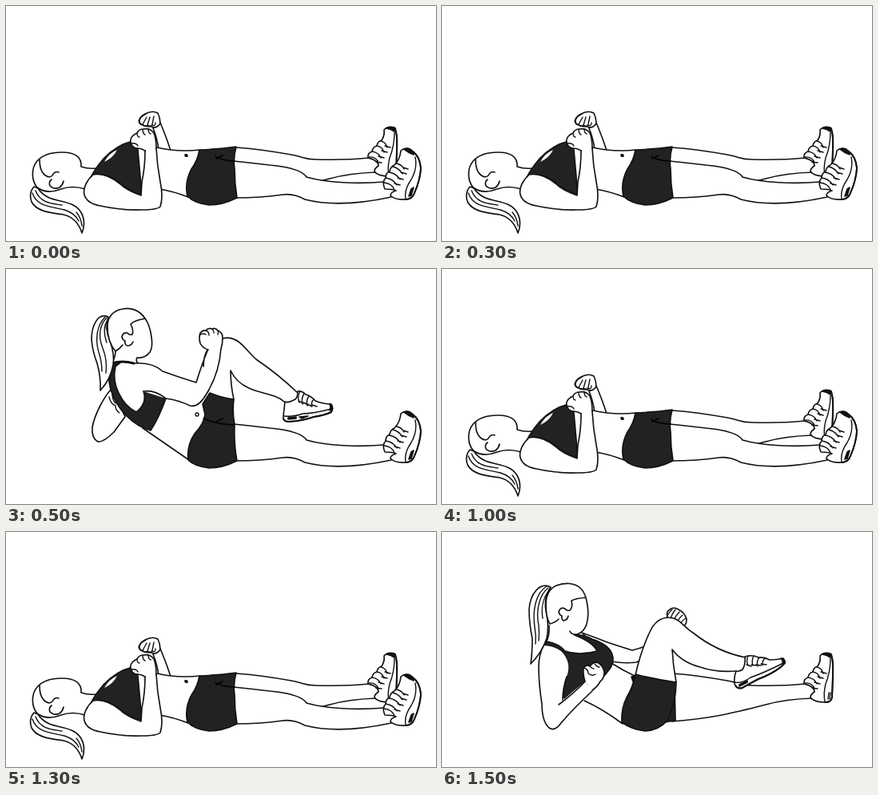
An HTML page that plays this animation: 538 by 294 pixels, repeating every 2 s.

```html
<!DOCTYPE html>
<html lang="en">
<head>
<meta charset="utf-8">
<title>Bicycle crunch</title>
<style>
  html, body { margin: 0; width: 100%; height: 100%; overflow: hidden; background: #fff; }
  svg { display: block; width: 100%; height: 100%; }
  path { fill: none; stroke: #111; stroke-width: 1.65; stroke-linecap: round; stroke-linejoin: round; }
  .skin { fill: #fff; }
  .blank { fill: #fff; stroke: none; }
  .cloth { fill: #222; }
  .ink { fill: #111; }
  .sole { stroke-width: 2; }
  .fine { stroke-width: 1.4; }
  .crease { stroke: #000; }
  .rest, .left, .right, .near, .far { animation: 2s step-end infinite; }
  .rest { animation-name: rest; }
  .left { animation-name: left; }
  .right { animation-name: right; }
  .near { animation-name: near; }
  .far { animation-name: far; }
  @keyframes rest { 0%, 50% { visibility: visible } 25%, 75%, 100% { visibility: hidden } }
  @keyframes left { 0%, 50%, 100% { visibility: hidden } 25% { visibility: visible } }
  @keyframes right { 0%, 100% { visibility: hidden } 75% { visibility: visible } }
  @keyframes near { 0% { visibility: visible } 75%, 100% { visibility: hidden } }
  @keyframes far { 0%, 50%, 100% { visibility: visible } 25% { visibility: hidden } }
</style>
</head>
<body>
<svg viewBox="0 0 538 294" role="img" aria-label="Bicycle crunch exercise">

  <!-- straight far leg -->
  <g class="far">
    <path class="blank" d="M288 177C316 179 340 183 357 186S372 192 388 192Q425 193 454 190L464 208Q430 209 405 216C370 225 340 233 288 237Z"/>
    <path d="M288 177C316 179 340 183 357 186S372 192 388 192Q425 193 454 190M464 208Q430 209 405 216C370 225 340 233 288 237"/>
    <path class="skin" d="M453 190Q452 184 458 182Q459 176 464 175Q465 169 470 168Q474 162 473 155Q477 150 486 152Q490 160 489 172Q489 186 488 206Q487 213 480 213Q465 213 461 207Q461 203 466 200Q466 193 453 190Z"/>
    <path class="sole" d="M487 153Q490 164 489 180L488 207Q487 213 480 213"/>
    <path class="fine" d="M486 158Q486 175 480 190Q477 202 479 213M458 182Q466 183 469 190M464 175Q471 176 473 183M469 169Q475 170 477 177M454 189Q463 188 466 196M466 188l7 2M470 181l7 2M474 175l7 2M463 195l7 1M484 201L483 209M486 201L485 209"/>
    <path class="ink" d="M476 153Q481 150 486 153L486 157Q482 154 476 153Z"/>
  </g>

  <!-- straight near leg -->
  <g class="near">
    <path class="blank" d="M270 194Q305 196 330 199C352 201 369 206 376 214C400 221 440 223 473 220L483 239C445 247 405 250 374 242Q360 234 346 236Q320 240 286 240Z"/>
    <path d="M266 192Q305 196 330 199C352 201 371 206 376 214C400 221 440 223 473 220M482 239C445 247 405 250 374 242Q360 234 346 236Q320 240 286 240"/>
    <path class="skin" d="M474 229Q470 220 475 215Q475 209 480 207Q481 201 486 199Q493 192 494 181Q500 175 509 182Q517 188 519 202Q519 216 511 234Q508 242 500 242Q487 243 481 237Q481 233 488 231Q484 229 474 229Z"/>
    <path class="sole" d="M509 182Q518 188 519 203Q518 218 511 234Q508 242 500 242"/>
    <path class="fine" d="M512 189Q515 203 507 217Q498 230 500 241M475 215Q484 216 489 224M479 208Q488 209 493 217M484 201Q492 203 496 210M488 197Q495 198 498 204M473 221Q483 222 486 230M486 222l7 2M490 215l7 2M494 208l7 2M497 202l6 2"/>
    <path class="ink" d="M498 179Q504 176 509 182L510 186Q504 184 498 179ZM507 229l3-2-3 10-3 1z"/>
  </g>

  <!-- lying flat -->
  <g class="rest">
    <path class="skin" d="M35 226Q28 234 32 245C39 258 58 259 72 261Q89 265 95 284C101 269 96 254 82 248C68 242 50 244 40 228Z"/>
    <path class="fine" d="M33 234C39 252 58 251 73 255Q86 259 91 269M37 231C43 247 58 247 70 249M88 258Q94 265 95 275"/>
    <path class="blank" d="M94 201L114 203L108 212L99 230L70 229Z"/>
    <path class="blank" d="M94 201C95 188 85 183 70 183C55 183 45 187 39 194C31 203 32 219 39 227Q51 236 69 229Q84 225 99 229L94 201Z"/>
    <path d="M113 203Q103 204 94 201C95 188 85 183 70 183C55 183 45 187 39 194C31 203 32 219 39 227Q51 236 69 229Q83 224 99 229"/>
    <path d="M42 192Q42 206 48 211Q54 216 58 212Q61 206 66 208M57 217Q53 220 55 225Q60 230 67 227Q71 224 72 219"/>

    <path class="skin" d="M184 153Q189 165 191 179L206 181Q201 165 193 146Z"/>
    <path class="skin" d="M174 135Q183 130 190 134Q193 140 193 147Q188 154 182 151Q171 151 167 146Q166 139 174 135Z"/>
    <path class="fine" d="M175 135Q167 139 166 144Q168 150 171 148L176 139M171 148Q174 152 177 149L180 139M177 149Q181 152 183 148L185 138M183 149Q187 151 187 146"/>
    <path class="blank" d="M168 172L192 178Q220 182 243 179L228 239L190 229L160 235Z"/>
    <path d="M189 177Q214 183 243 180M192 229Q210 232 228 239"/>
    <path class="cloth" d="M100 227Q108 207 122 191Q138 174 158 169Q164 172 165 180L170 236Q153 231 142 221Q123 207 108 212Z"/>
    <path class="blank" d="M139 180Q129 184 123 195Q134 190 139 180Z"/>
    <path class="cloth" d="M242 180Q266 179 288 176Q284 190 286 204Q286 222 289 240Q271 249 254 249Q236 247 227 238Q223 221 232 204Q240 193 242 180Z"/>
    <path class="crease" d="M262 188Q267 193 286 194M263 191L271 187"/>
    <path class="ink" d="M224 186q3-1 3 2q-3 1-3-2Z"/>

    <path class="skin" d="M109 211C101 218 96 228 98 236Q101 247 118 250Q145 256 170 255Q189 255 193 251Q197 239 193 220Q189 199 188 178L174 181Q174 202 170 220L169 237Q151 231 142 222Q124 208 109 211Z"/>
    <path class="skin" d="M157 173Q154 168 158 163Q161 160 164 159Q166 154 172 154Q180 152 185 159Q188 166 188 178Q181 182 174 181Q169 178 165 178Q159 178 157 173Z"/>
    <path class="blank" d="M175 177h12v6h-12z"/>
    <path class="fine" d="M164 159Q164 164 167 164M171 154Q171 160 174 161M178 154Q178 159 181 160M157 172Q163 171 165 175"/>
  </g>

  <!-- twisted, holding the far knee -->
  <g class="left">
    <path class="skin" d="M131 151C123 160 111 181 108 198Q107 212 115 216Q122 217 135 204Q143 193 149 185L137 158Z"/>
    <path class="fine" d="M129 160Q131 169 137 171Q137 177 142 180M133 156Q133 164 137 168"/>
    <path class="blank" d="M137 101L164 110L166 119L196 128L205 163L242 171L250 180L228 239L172 200L143 176L130 145L131 118Z"/>
    <path d="M137 102Q137 111 132 118M164 110Q162 115 165 118M171 199L229 239"/>
    <path class="cloth" d="M131 117Q126 132 131 151Q137 170 151 184Q165 198 181 202Q191 187 200 162Q185 151 172 153Q177 168 163 179Q149 172 141 155Q133 139 137 122L143 117Z"/>
    <path style="stroke-width:3" d="M132 118Q145 114 160 118"/>

    <path class="blank" d="M268 98Q273 84 285 88C298 92 304 104 313 113Q341 132 365 155Q361 166 348 166C337 156 318 156 304 149Q288 142 281 127Q281 144 285 164L254 157Z"/>
    <path d="M271 87Q281 84 291 91C299 97 304 105 313 113Q341 132 365 155M348 166C337 156 318 156 304 149Q288 142 281 127Q281 145 285 163"/>
    <g transform="translate(1)">
      <path class="skin" d="M364 153Q364 161 361 163Q352 168 348 166Q347 176 346 184Q345 191 352 191Q370 190 384 185Q397 183 406 179Q409 174 406 169Q396 169 386 165Q381 159 374 157Q369 152 364 153Z"/>
      <path class="sole" d="M346 187Q347 191 353 191Q371 190 384 185Q398 183 406 179"/>
      <path class="fine" d="M347 184Q360 185 370 181Q383 181 406 175M367 153Q363 160 366 167M372 156Q368 162 370 169M378 159Q374 165 376 171M384 163Q380 167 382 172M365 165l6 3M371 167l6 3M376 169l6 3M382 170l6 2"/>
      <path class="ink" d="M404 169Q409 172 407 177L404 177Q406 173 404 169ZM352 186l10-1v2l-10 1zM366 185l11-1-8 3z"/>
    </g>

    <path class="cloth" d="M255 155Q269 161 285 163Q283 179 286 195Q285 219 289 240Q271 249 254 249Q236 247 228 239Q226 221 236 206Q248 193 249 182L246 169Z"/>
    <path class="crease" d="M247 187Q262 194 286 195M263 191L271 187"/>
    <path class="fine" d="M237 182q0-2 2-2q2 0 2 2q0 2-2 2q-2 0-2-2Z"/>

    <path class="blank" d="M165 118Q183 116 196 128Q218 136 238 142Q245 119 253 100L269 98Q267 130 251 156Q241 174 230 171Q216 164 200 162L172 153Z"/>
    <path d="M160 118Q183 116 196 128Q218 136 238 142Q245 119 253 100M269 99Q267 130 251 156Q241 174 230 171Q216 164 200 162Q186 151 172 153M252 101Q247 110 247 122"/>
    <path class="blank" d="M253 101Q246 99 243 93Q241 86 243 80Q246 76 250 77Q253 73 258 75Q262 73 265 77Q271 79 271 86Q271 94 269 100Z"/>
    <path d="M253 101Q246 99 243 93Q241 86 243 80Q246 76 250 77Q253 73 258 75Q262 73 265 77Q271 79 271 86Q271 94 269 100"/>
    <path class="fine" d="M250 77Q254 78 254 83M258 75Q260 77 260 80M265 77Q266 79 265 82M243 82Q247 80 250 82"/>

    <path class="skin" d="M128 60C115 54 107 71 107 88Q108 102 114 118Q119 136 118 152Q131 138 134 120Q136 106 130 90Q123 74 128 60Z"/>
    <path class="fine" d="M124 60C114 70 111 87 116 104Q120 116 120 128M126 61C117 70 115 84 121 99Q127 114 125 130M127 64Q120 75 126 92"/>
    <path class="blank" d="M164 111Q174 112 180 104Q184 98 182 85Q180 70 174 62C167 51 156 48 146 50C133 52 126 62 127 73Q127 91 137 103Q144 98 147 95Z"/>
    <path d="M164 111Q174 112 180 104Q184 98 182 85Q180 70 174 62C167 51 156 48 146 50C133 52 126 62 127 73Q127 91 137 103Q143 99 146 95"/>
    <path d="M174 62Q161 64 156 69Q160 77 158 82Q154 83 152 80Q146 79 145 85Q146 89 149 90Q148 95 152 96Q157 96 159 91"/>
  </g>

  <!-- twisted, near knee up -->
  <g class="right">
    <path class="skin" d="M175 126Q192 132 207 138Q225 144 238 148Q254 144 276 134L280 145L243 163Q229 165 212 162Z"/>
    <path class="skin" d="M282 107Q280 99 285 97Q290 93 296 97Q304 101 306 109Q306 116 302 118Q292 116 282 107Z"/>
    <path class="fine" d="M282 105Q284 100 288 97M286 108Q288 102 292 97M290 111Q292 105 297 100M294 114Q296 108 301 104M298 116Q300 111 305 108"/>
    <path class="blank" d="M134 115L168 125L212 150L212 163L242 179L226 240L178 211L152 207L127 142Z"/>
    <path d="M134 117Q135 130 130 138M167 127Q167 130 176 132M178 211Q202 222 226 240M212 164Q226 173 241 180"/>
    <path class="cloth" d="M166 129Q177 128 188 134Q209 141 213 153Q217 164 207 175Q196 190 181 191Q169 202 155 209L150 205Q152 191 156 181Q163 163 149 149Q139 142 127 142L132 137Q147 140 154 149Q171 155 194 149Q189 138 166 129Z"/>

    <path class="cloth" d="M291 186L292 236L278 238Z"/>
    <path class="blank" d="M243 179Q249 148 260 125Q268 107 284 107C297 107 302 119 314 126Q344 150 380 157L368 175Q343 176 323 169Q300 163 288 147Q289 167 293 188Z"/>
    <path d="M242 179Q249 148 260 125Q268 107 284 107C297 107 302 119 314 126Q344 150 380 157M368 174Q343 176 323 169Q300 163 288 147Q289 167 293 188"/>
    <path class="skin" d="M379 156Q380 166 376 172Q372 175 368 174Q365 182 366 190Q369 197 375 195Q385 190 395 184Q412 178 425 168Q431 164 427 158Q418 160 410 160Q403 156 396 157Q388 153 379 156Z"/>
    <path class="sole" d="M367 192Q370 197 376 195Q386 189 396 184Q413 178 425 168L429 164"/>
    <path class="fine" d="M366 188Q375 190 386 182Q401 177 427 164M383 155Q380 161 383 167M390 155Q387 161 389 167M397 157Q393 162 395 168M404 158Q400 162 401 167M381 166l6 2M387 166l6 1M393 166l6 1M399 165l7 1"/>
    <path class="ink" d="M424 158Q430 159 429 164L426 165Q427 161 424 158ZM372 191l10-5v2l-10 5z"/>
    <path class="cloth" d="M242 178Q265 184 293 188Q293 212 282 236Q270 249 254 249Q237 247 225 238Q224 221 231 207Q239 194 242 178Z"/>
    <path class="ink" d="M237 181l4-1-2 7z"/>

    <path class="blank" d="M127 142Q121 153 121 170Q121 190 125 215Q125 237 134 245Q141 250 149 239Q164 221 188 199L179 187Q163 200 151 211Q152 191 156 181Q163 163 149 149Q139 142 127 142Z"/>
    <path d="M127 142Q121 153 121 170Q121 190 125 215Q125 237 134 245Q141 250 149 239Q164 221 188 199M179 187Q165 202 146 216M151 210Q151 196 156 181"/>
    <path class="blank" d="M179 187Q176 178 177 170Q181 165 185 168Q190 161 196 164Q202 168 203 176Q203 183 198 187Q194 194 188 198Z"/>
    <path d="M179 187Q176 178 177 170Q181 165 185 168Q190 161 196 164Q202 168 203 176Q203 183 198 187Q194 194 188 198"/>
    <path class="fine" d="M178 170Q183 172 183 177M185 168Q188 171 190 171M191 165Q194 169 197 169M183 177Q188 181 192 178"/>

    <path class="skin" d="M136 69C122 62 110 78 109 97Q109 115 113 133Q113 151 111 165Q125 151 131 133Q134 119 131 103Q126 83 136 69Z"/>
    <path class="fine" d="M131 68C117 76 113 99 116 119Q118 130 117 140M133 70C122 78 117 98 121 117Q122 127 121 136M135 72C126 82 124 96 126 108"/>
    <path class="blank" d="M165 128Q177 127 181 115Q184 104 182 92Q180 77 174 71C166 63 153 63 143 67C132 72 130 83 130 91Q130 107 135 115Q142 114 148 109Z"/>
    <path d="M160 124Q162 129 169 128Q178 125 181 115Q184 104 182 92Q180 77 174 71C166 63 153 63 143 67C132 72 130 83 130 91Q130 107 135 115Q142 113 146 109"/>
    <path d="M180 82Q167 83 162 86Q164 94 160 98Q156 99 154 96Q148 93 146 100Q147 104 150 105Q149 109 152 111Q157 110 158 105"/>
  </g>
</svg>
</body>
</html>
```
